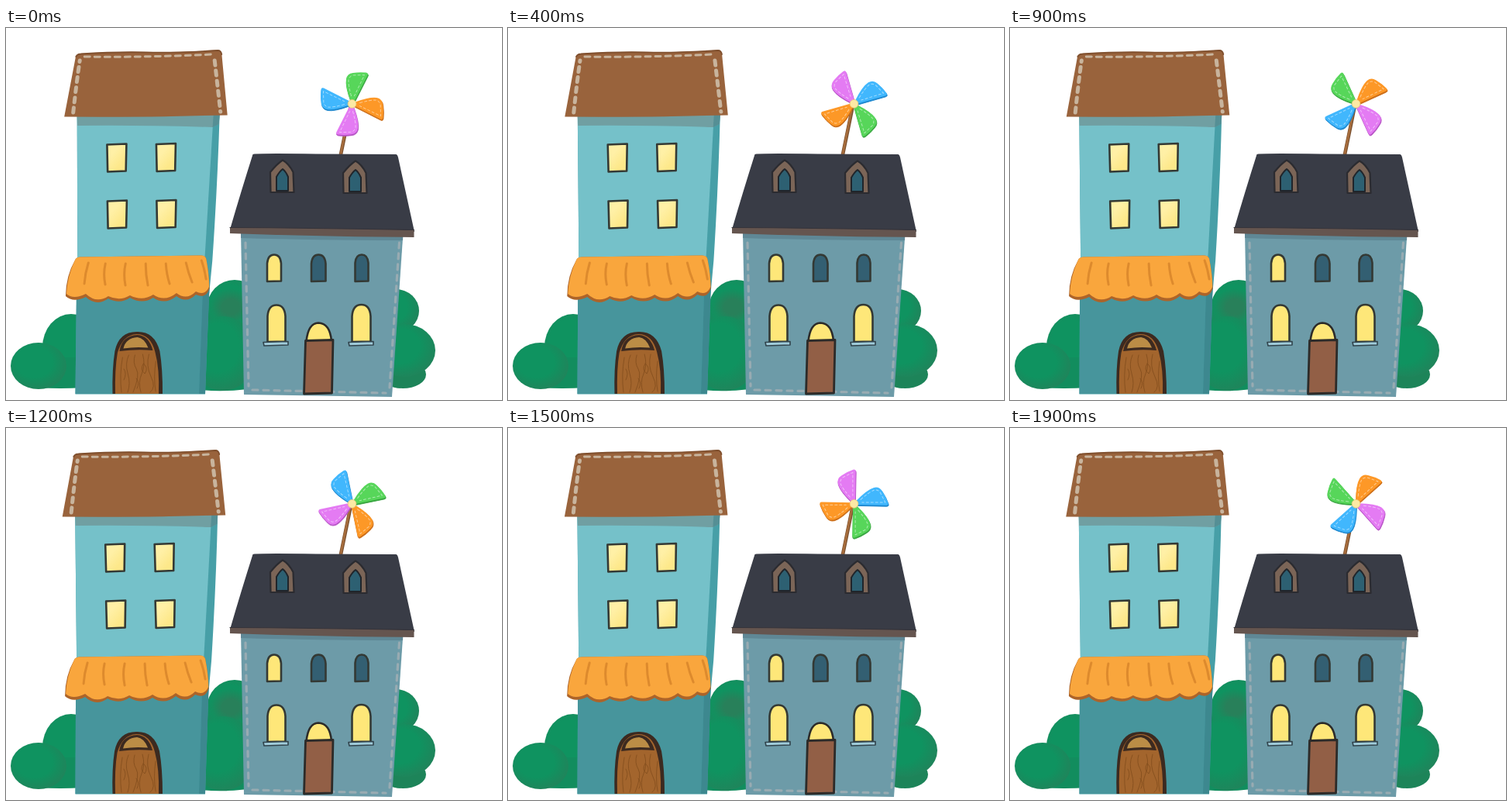
Write an HTML page that moves like this. It is 640 px wide and 480 px high and loops after 2 s.

```html
<!DOCTYPE html>
<html lang="en">
<head>
<meta charset="utf-8">
<title>Two houses and a pinwheel</title>
<style>
  html, body { margin: 0; width: 100%; height: 100%; overflow: hidden; background: #fff; }
  svg { display: block; width: 640px; height: 480px; }
  path, line { stroke-linejoin: round; stroke-linecap: round; }
  .dash { fill: none; stroke-linecap: round; }
  .ink { stroke: #343934; stroke-width: 2.6; }
</style>
</head>
<body>
<svg viewBox="0 0 640 480">
  <defs>
    <radialGradient id="leaf" cx=".42" cy=".42" r=".65">
      <stop offset=".5" stop-color="#0f9360"/>
      <stop offset="1" stop-color="#22825a"/>
    </radialGradient>
    <radialGradient id="shade">
      <stop offset=".4" stop-color="#28805a"/>
      <stop offset="1" stop-color="#28805a" stop-opacity="0"/>
    </radialGradient>
    <linearGradient id="pane" x2=".8" y2="1">
      <stop offset=".35" stop-color="#fff0a6"/>
      <stop offset=".8" stop-color="#fde88a"/>
    </linearGradient>
    <g id="dormer">
      <path d="M341.5 212 341 186Q350 175 357 170.5Q365 175 370.5 186L371.5 212Z" fill="#7b6557" stroke="#2b2b30" stroke-width="2.2"/>
      <path d="M349 210V192Q353 185 357 182Q361 185 364 192V210Z" fill="#2d6072" stroke="#20252b" stroke-width="2"/>
    </g>
  </defs>

  <g id="bushes" fill="url(#leaf)">
    <ellipse cx="84" cy="412" rx="37" ry="43"/>
    <path d="M45 425H100V464Q70 466 40 464Z" fill="#128d5e"/>
    <ellipse cx="42" cy="436" rx="36" ry="30"/>
    <path d="M256 360H312V466Q280 470 250 467Z" fill="#128d5e"/>
    <ellipse cx="295" cy="362" rx="36" ry="37"/>
    <ellipse cx="290" cy="360" rx="28" ry="24" fill="url(#shade)"/>
    <ellipse cx="280" cy="420" rx="42" ry="48"/>
    <ellipse cx="503" cy="365" rx="30" ry="28"/>
    <ellipse cx="512" cy="447" rx="30" ry="18" fill="#1d8459"/>
    <ellipse cx="514" cy="416" rx="40" ry="34"/>
  </g>

  <g id="tower">
    <path d="M89 112 273 110Q271 200 265 300L261 345 257 472.5H89.5L90 345 91 295Z" fill="#479fa7"/>
    <path d="M89 112H265L255 300H91Z" fill="#75c1c9"/>
    <path d="M89 114 273 111 272 124 264 128Q170 125 89.5 126Z" fill="#709fa2"/>
    <path d="M265 112H273L272 124 264 128Z" fill="#558f95"/>
    <path d="M90 335H253L249 472H89.5Z" fill="#47959c"/>
    <path d="M253 335H261.5L257 472H249Z" fill="#3d888f"/>

    <path d="M72.5 114.5 86.5 38Q87.5 34 93 33Q140 30 178 31T270 28.5Q274 28.5 275 33L283 112.5Q250 113 210 114T72.5 114.5Z" fill="#99633c"/>
    <path d="M87 37Q89 33.5 93 33.5Q140 30.5 178 31.5T270 29Q274 29 275 34" fill="none" stroke="#80502e" stroke-width="1.8"/>
    <g class="dash" stroke="#c8b49d">
      <path d="M84 109Q88 70 92 42" stroke-width="5" stroke-dasharray="6 7.2"/>
      <path d="M98 37Q180 38 262 34" stroke-width="3" stroke-dasharray="7 6"/>
      <path d="M266 42 274 108" stroke-width="5" stroke-dasharray="6 7.2"/>
    </g>
    <g id="panes" fill="url(#pane)" class="ink"></g>

    <g id="awning">
      <path d="M88 299Q89 296 94 295.5L250 293.5Q256 293.5 257 298Q261 318 261.5 336Q257 350 244 344Q232 356 219 346Q204 358 189 348Q175 357 159 348Q146 357 131 349Q116 360 102 347Q86 355 76 346Q76 320 88 299Z" fill="#ad6429"/>
      <path d="M88 299Q89 296 94 295.5L250 293.5Q256 293.5 257 298Q261 318 261 334Q256 346 244 340Q232 352 219 342Q204 354 189 344Q175 353 159 345Q146 353 131 346Q116 356 102 343Q86 351 77 343Q78 320 88 299Z" fill="#f9a63d"/>
      <path d="M105 303Q101 316 100 330M127 304Q124 317 127 331M153 304Q150 317 153 332M179 304Q179 318 182 332M205 304Q206 318 210 330M231 303Q234 316 239 328M251 300Q255 311 257 324" fill="none" stroke="#dd8a2d" stroke-width="3"/>
    </g>

    <path d="M137.5 472Q136.5 440 140 417Q145 392 168 392Q191 391 198 417Q202 440 202 472Z" fill="#3c2a20"/>
    <path d="M141 472Q140 440 143.5 419Q150 396 168 395Q186 395 192 418Q198 440 197 472Z" fill="#a3652d"/>
    <path d="M146 417Q149 397 169 396Q184 397 189 416Q168 414 146 417Z" fill="#3c2a20"/>
    <path d="M151 413.5Q154 400 169 399Q178 400 183 412.5Q166 411 151 413.5Z" fill="#bb8d46"/>
    <g fill="none" stroke="#85501f" stroke-width=".9">
      <path d="M150 425Q146 448 149 470M158 422Q153 433 157 446T157 470M166 422Q163 432 168 440T164 470M176 421Q180 435 175 446T174 470M184 421Q180 436 187 450T186 470M193 430Q190 450 193 469"/>
      <path d="M177 433Q184 438 179 446Q172 441 177 433M168 452Q173 458 169 465M152 440Q156 446 152 454"/>
    </g>
  </g>

  <g id="stick" fill="none">
    <path d="M445 100 432 163" stroke="#79502f" stroke-width="4.6"/>
    <path d="M444.5 100 431.8 163" stroke="#a76d3d" stroke-width="2.8"/>
  </g>

  <g id="cottage">
    <path d="M303 262 512.5 264 498 476 307 473Z" fill="#6d9ba8"/>
    <path d="M303 262 512.5 264 512 274Q400 274 303 271Z" fill="#5f8795"/>
    <g class="dash" stroke="#98abb2" stroke-width="3.2" stroke-dasharray="7 7">
      <path d="M309 277 313 462"/>
      <path d="M318 467 490 471"/>
      <path d="M507.5 277 495 464"/>
    </g>
    <path d="M318.5 163Q321 161.5 400 162.5L503 163Q505 163 506 167L527 263 289 260Q302 215 318.5 163Z" fill="#393c46"/>
    <path d="M289 257.5Q400 258 526.5 260.5V270Q400 269 289 265Z" fill="#65554f"/>
    <path d="M289 257.5Q400 258 526.5 260.5" fill="none" stroke="#34333a" stroke-width="1.2"/>
    <use href="#dormer"/>
    <use href="#dormer" x="94" y="1"/>
    <g id="arches" class="ink"></g>
    <g fill="#9fcbd9" stroke="#30434c" stroke-width="1.6">
      <path d="M332 405.5 364 404.5V409L333 410Z"/>
      <path d="M442 405.5 474 404.5V409L443 410Z"/>
    </g>
    <path d="M387.5 404Q390 381 403 380.5Q418 381 420 404Z" fill="#fee779" stroke="#2c2b29" stroke-width="2.6"/>
    <path d="M386.5 403.5 422 402.5 420.5 471 384.5 472Z" fill="#925f46" stroke="#2c2b29" stroke-width="2.8"/>
  </g>

  <g id="rims"></g>
  <g id="blades"></g>
  <circle cx="446.5" cy="97.8" r="5.4" fill="#fce9a4" stroke="#e9c878" stroke-width=".8"/>
</svg>
<script>
  const el = id => document.getElementById(id);
  const STEP = 100, STEPS = 20;
  const TURN = 720 / 21;            // degrees per step
  const HUB = [446.5, 97.6], BASE = 472;

  // Sideways sway near the tower's roof: [step, pixels]
  const SWAY = [[0, 3], [4, 0.9], [7, 0.2], [9, 0.3], [14, 0.2], [17, 1], [19, -0.3]];

  const pane = ([x, y]) =>
    `<path d="M${x} ${y + 1}L${x + 25} ${y}L${x + 24.5} ${y + 35}L${x + 1} ${y + 36}Z"/>`;
  el("panes").innerHTML = [[128, 149.5], [191.5, 149], [129, 222.5], [192.5, 222]].map(pane).join("");

  const arch = ([x, top, w, bottom, fill]) => {
    const r = w / 2, shoulder = top + r * 1.25;
    return `<path fill="${fill}" d="M${x} ${bottom}V${shoulder}Q${x + 1} ${top} ${x + r} ${top}` +
      `Q${x + w - 1} ${top} ${x + w} ${shoulder}V${bottom - 0.5}Z"/>`;
  };
  const LIT = "#fee779", DIM = "#335f72";
  el("arches").innerHTML = [
    [337, 292.5, 18, 327, LIT], [394, 292.5, 18.5, 327, DIM], [450.5, 292.5, 17, 327, DIM],
    [337.5, 357.5, 23, 405, LIT], [446.5, 357, 24, 405, LIT]
  ].map(arch).join("");

  const BLADE = "M-2 -4Q-9 -23 -7.5 -32Q-6 -39 1 -39.7Q10 -41 18 -40Q21.5 -39.5 20 -36.5L3 -3Z";
  const STITCH = "M-1 -10Q-5 -24 -4.5 -31Q-3 -36 2 -36.7L16 -37L3 -10";
  const COLORS = [["#57d65a", "#38a640"], ["#fd9827", "#cc6d17"], ["#e47bf3", "#b653c5"], ["#41b7fd", "#1c87cf"]];
  const ring = draw => COLORS.map((pair, i) => `<g transform="rotate(${i * 90})">${draw(pair)}</g>`).join("");
  el("rims").innerHTML = ring(([, rim]) => `<path d="${BLADE}" fill="${rim}" stroke="${rim}" stroke-width=".8"/>`);
  el("blades").innerHTML = ring(([face]) =>
    `<path d="${BLADE}" fill="${face}"/>` +
    `<path d="${STITCH}" fill="none" stroke="#fff" stroke-opacity=".5" stroke-width="1" stroke-dasharray="3 3"/>`);

  function swayAt(step) {
    const next = SWAY.findIndex(([s]) => s >= step);
    const [s1, v1] = SWAY[next];
    if (s1 === step) return v1;
    const [s0, v0] = SWAY[next - 1];
    return v0 + (v1 - v0) * (step - s0) / (s1 - s0);
  }

  function render(now) {
    const step = Math.floor(now / STEP) % STEPS;
    const shear = -swayAt(step) / 400;
    el("tower").setAttribute("transform", `matrix(1 0 ${shear} 1 ${-shear * BASE} 0)`);
    const [x, y] = HUB, angle = step * TURN;
    el("blades").setAttribute("transform", `translate(${x} ${y}) rotate(${angle})`);
    el("rims").setAttribute("transform", `translate(${x + 0.5} ${y + 1.4}) rotate(${angle})`);
  }

  function tick() {
    render(performance.now() - start);
    requestAnimationFrame(tick);
  }
  const start = performance.now();
  tick();
</script>
</body>
</html>
```
